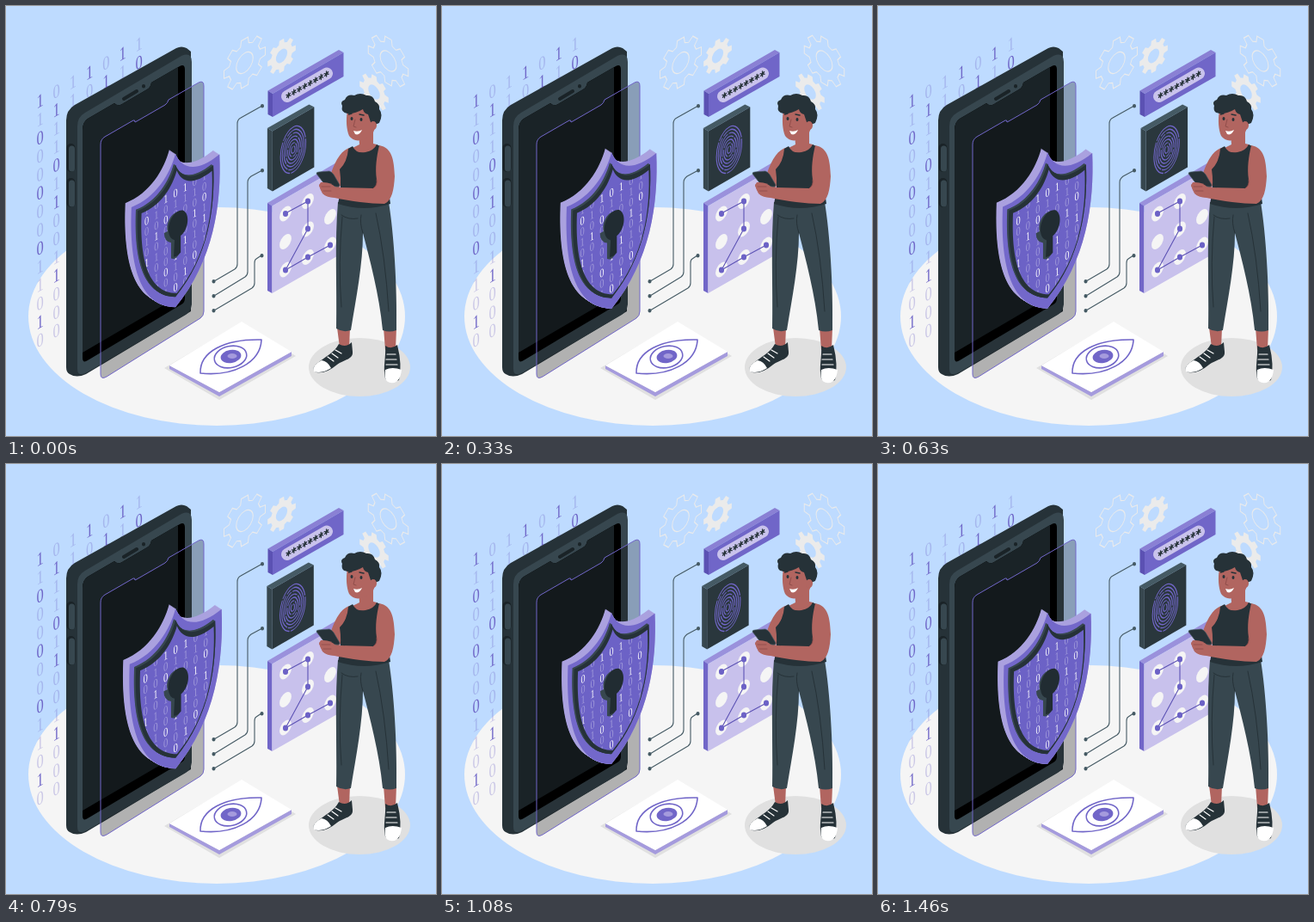
An HTML page for the animation above (1.5 s loop, 500 px wide and 500 px high).

```html
<!DOCTYPE html>
<html lang="en">
<head>
<meta charset="utf-8">
<title>Mobile security</title>
<style>
  html, body { margin: 0; height: 100%; overflow: hidden; background: #bedbff; }
  svg { display: block; width: 100%; height: 100%; }
  text { font-family: "Liberation Serif", serif; text-anchor: middle; }
  .line { fill: none; stroke-linecap: round; stroke-linejoin: round; }
</style>
</head>
<body>
<svg viewBox="0 0 500 500">
  <defs>
    <path id="crest" d="M0 173C6 192 22 210 50.5 204C53 262 44 322 0 349C-44 322-53 262-50.5 204C-22 210-6 192 0 173Z"/>
    <clipPath id="plate"><use href="#crest" transform="matrix(.8 -.48 0 .8 198.5 53.8)"/></clipPath>
  </defs>
  <rect width="500" height="500" fill="#bedbff"/>
  <ellipse cx="245" cy="361" rx="219" ry="127" fill="#f5f5f5"/>
  <g id="gears"></g>
  <g id="rain" fill="#6c62c6" font-size="22"></g>

  <g id="phone">
    <path fill="#263238" d="M70 133Q70 121 80 115L198 49Q204 46 210 49L215 53V355L93 428Q82 433 74 428Q70 426 70 420Z"/>
    <path fill="#37474f" d="M83 140Q83 129 92 124L204 58Q216 53 216 65V347Q215 355 209 359L94 426Q83 432 83 422Z"/>
    <path fill="#000" d="M89 144Q89 135 95 131L126 113Q130 117 135 114L164 97Q168 95 169 89L202 70Q208 67 208 74V340Q208 345 204 347L95 412Q89 416 89 409Z"/>
    <path fill="#1a2327" d="M89 144Q89 135 95 131L126 113Q130 117 135 114L164 97Q168 95 169 89L200 71V338L89 403Z"/>
    <path class="line" stroke="#1a2327" stroke-width="4" d="M137 108L152 99M160 93.500V93"/>
    <path class="line" stroke="#1a2327" stroke-width="10" d="M75.500 165V188M75.500 205V229"/>
    <path class="line" stroke="#37474f" stroke-width="7" d="M76.500 166V189M76.500 206V230"/>
  </g>
  <path fill="#000" fill-opacity=".28" stroke="#7166c8" d="M110 161Q110 155 115 152L148 133Q150 132 150 135L152 134L185 115Q188 113 189 109L224 89Q230 86 230 93V355Q230 360 226 363L117 431Q110 435 110 428Z"/>

  <g class="line" stroke="#455a64" stroke-width="1.100">
    <path d="M298 116L273 130Q269 132 269 137V300Q269 304 266 306L242 320"/>
    <path d="M298 191L285 198Q281 201 281 205V309Q281 313 278 315L242 337"/>
    <path d="M297 290L291 294Q289 295 289 299V322Q289 326 286 328L242 354"/>
    <path stroke-width="4" d="M298 116v.5M298 191v.5M297.500 290v.5M241.500 320v.5M241.500 337v.5M241.500 354v.5"/>
  </g>

  <g id="shield">
    <g id="rim" fill="#aaa1df"></g>
    <use href="#crest" transform="matrix(1 -.6 0 1 197 0)" fill="#7368ca"/>
    <g id="recess" fill="#37474f"></g>
    <use href="#crest" transform="matrix(.86 -.516 0 .86 197 37)" fill="#263238"/>
    <use href="#crest" transform="matrix(.8 -.48 0 .8 198.5 53.8)" fill="#6c62c6"/>
    <g id="code" clip-path="url(#plate)" fill="#fff" font-size="13.500"></g>
    <path fill="#37474f" d="M188 262C185 248 198 235 206 240C212 245 209 260 201 267L201 288Q197 295 192 293L192 275Q184 274 184 264Z"/>
    <path fill="#212c32" d="M189 262C188 249 198 236 206 238C214 242 212 260 203 267L203 286Q199 291 195 291L196 272Q190 271 189 262Z"/>
  </g>

  <g id="password">
    <path fill="#8a80d4" d="M304.500 98.500L387 51L392.500 54L310 102Z"/>
    <path fill="#5b51b3" d="M304.500 98.500L310 102V129L304.500 126Z"/>
    <path fill="#7066c8" d="M310 102L392.500 54V82L310 129Z"/>
    <path class="line" stroke="#c9c3ec" stroke-width="14" d="M327 105L373 78.500"/>
    <g id="stars" class="line" stroke="#263238" stroke-width="1.300"></g>
  </g>

  <g id="print">
    <path fill="#455a64" d="M304 142L352.500 114.500L358.500 117.500L310 145.500Z"/>
    <path fill="#37474f" d="M304 142L310 145.500V215.500L304 212Z"/>
    <path fill="#2a373d" d="M310 145.500L358.500 117.500V187.500L310 215.500Z"/>
    <g id="ridges" class="line" stroke="#7166c8" transform="matrix(.87 -.5 0 1 334 167)"></g>
  </g>

  <g id="pattern">
    <path fill="#9a91dc" d="M304 229L386 181L392 185L309.500 232.500Z"/>
    <path fill="#7166c8" d="M304 229L309.500 232.500V334L304 331Z"/>
    <path fill="#c8c1ec" d="M309.500 232.500L392 185V287L309.500 334Z"/>
    <g id="dots"></g>
    <path class="line" stroke="#5d53b5" stroke-width="1.100" d="M325 241L351 227V259L325 307L351 292L377 278"/>
    <path class="line" stroke="#6c62c6" stroke-width="6" d="M325 241v1M351 226.500v1M351 258.500v1M325 306.500v1M351 291.500v1M377 277.500v1"/>
  </g>

  <g id="eye">
    <path fill="#e0e0e0" d="M184 421L274 368L337 407L248 458Z"/>
    <path fill="#a59bdd" d="M190 418L248 449L332 402V407L248 454L190 422Z"/>
    <path fill="#fff" d="M190 418L274 367L332 402L248 449Z"/>
    <g class="line" stroke="#7166c8" stroke-width="1.600">
      <path d="M226 427C225 402 254 387 297 388C296 415 264 431 226 427Z"/>
      <ellipse cx="261" cy="408" rx="19" ry="12.500" transform="rotate(-12 261 408)"/>
    </g>
    <ellipse cx="261.500" cy="407.500" rx="12" ry="7.500" transform="rotate(-10 261.500 407.500)" fill="#7166c8"/>
    <ellipse cx="263" cy="407" rx="5.500" ry="3" fill="#a59bdd"/>
  </g>

  <g id="person">
    <ellipse cx="411" cy="420" rx="59" ry="34" fill="#e0e0e0"/>
    <g fill="#b16560">
      <path d="M385 374H400L399 398L388 397ZM439 374H454L453 400H441Z"/>
      <path d="M402 164C390 167 384 178 378 194L371 204L382 220L392 204Z"/>
    </g>
    <path fill="#263238" d="M387 393C382 403 371 408 361 416Q354 423 361 426Q372 428 385 417C393 411 404 411 403 402L402 391Q395 398 387 393Z"/>
    <path fill="#fff" d="M367 412Q355 418 358 425Q367 428 378 421Q374 413 367 412Z"/>
    <path fill="#263238" d="M441 395C442 409 438 420 441 433Q447 440 457 435Q461 418 455 394Q448 400 441 395Z"/>
    <path fill="#fff" d="M441 423Q439 437 447 438Q458 440 460 423Q449 419 441 423Z"/>
    <path class="line" stroke="#fff" stroke-width="1.200" d="M383 400L390 404M379 404L386 409M374 408L381 413M443 405H453M442 411H454M442 417H455"/>
    <path fill="#37474f" d="M386 228L445 228C451 265 455 325 454 377Q446 380 438 377C434 335 423 295 415 264C415 300 407 340 401 377Q392 380 384 375C385 325 382 275 386 228Z"/>
    <path class="line" stroke="#263238" stroke-width="1" d="M415 264Q411 252 413 243M390 243Q398 249 409 247M391 245Q386 300 390 350M430 241Q441 290 445 355"/>
    <path fill="#b16560" d="M410 147L427 141V160Q434 161 436 166Q419 188 401 166L411 161Z"/>
    <path fill="#263238" d="M403 163Q407 172 418 170Q428 168 431 161L437 164Q433 183 443 201L447 230Q416 240 386 230Q391 210 388 190Q397 181 398 166Z"/>
    <path fill="#b16560" d="M434 162C449 165 451 178 452 198C451 214 449 226 440 230C423 230 401 227 382 223Q369 222 366 214L364 208Q367 203 376 206L388 211L427 212Q432 209 431 202C429 188 431 175 434 162Z"/>
    <path fill="#263238" stroke="#455a64" stroke-width=".7" d="M361 195Q361 193 364 193L376 192Q379 193 381 196L388 208Q388 211 384 210L371 208Z"/>
    <path fill="#b16560" d="M366 205Q378 204 383 211L386 222Q374 224 368 218L364 209Z"/>
    <path class="line" stroke="#8e4b49" stroke-width=".8" d="M367 210L377 210M369 215L378 215M431 202Q432 209 427 212"/>

    <path fill="#b16560" d="M397 121C395 133 396 144 399 151Q404 158 413 156Q423 154 427 147L432 135L424 115H400Z"/>
    <path fill="#263238" d="M397 125Q389 124 391 116Q388 111 394 109Q397 102 405 104Q412 100 419 104Q427 103 429 111Q435 114 434 120Q439 126 434 136Q428 139 424 135L421 126Q416 125 415 120Q405 126 397 125Z"/>
    <ellipse cx="427" cy="139" rx="4" ry="5" fill="#b16560"/>
    <path class="line" stroke="#263238" stroke-width="1.400" d="M398.500 126L402 125M411 126L416 127"/>
    <g fill="#263238"><ellipse cx="402" cy="131" rx="1.500" ry="2"/><ellipse cx="413" cy="132" rx="1.500" ry="2"/></g>
    <path class="line" stroke="#8e4b49" stroke-width=".9" d="M406 132L404 140L407 141"/>
    <path fill="#fff" d="M404 145Q409 147 414 144Q411 151 406 149Z"/>
  </g>
</svg>
<script>
const $ = id => document.getElementById(id);
const range = n => [...Array(n).keys()];
const fill = (id, parts) => { $(id).innerHTML = parts.join(''); };

function gear(x, y, radius, skew, style) {
  const at = (r, a) => `${(r * Math.cos(a)).toFixed(1)} ${(r * Math.sin(a)).toFixed(1)}`;
  const teeth = range(8).map(i => [[-.26, .76], [-.16, 1], [.16, 1], [.26, .76]]
    .map(([da, k]) => at(radius * k, i * Math.PI / 4 + da)).join('L')).join('L');
  const hole = radius * .4;
  return `<path transform="matrix(.87 ${skew} 0 1 ${x} ${y})" fill-rule="evenodd" ${style}
    d="M${teeth}ZM${hole} 0A${hole} ${hole} 0 1 0 ${-hole} 0A${hole} ${hole} 0 1 0 ${hole} 0Z"/>`;
}
const outlined = 'fill="none" stroke="#ebebeb" stroke-width="1.1"';
const solid = 'fill="#ebebeb"';
fill('gears', [
  gear(277.5, 66, 28, -.5, outlined), gear(320.5, 58, 19, -.5, solid),
  gear(444.5, 64, 27, .5, outlined), gear(428, 100, 19.5, .5, solid)
]);

// Digits 1 and 0 are bright; i and o are their faint forms.
const column = (x, y, step, digits, faint) => [...digits].map((c, i) => {
  const dim = c === 'i' || c === 'o';
  return `<text transform="matrix(.75 -.43 0 1 ${x} ${y + i * step})" dy=".34em"
    opacity="${dim ? faint : .95}">${c === 'i' || c === '1' ? 1 : 0}</text>`;
}).join('');

fill('rain', ['1i0oo0oo0iio1o', 'o1ii0i1ooi1ooo', 'iii', '1o1', 'o1', '1ii', 'i0']
  .map((digits, i) => column(39.5 + i * 19.2, 110 - i * 11, 21.4, digits, .3)));
fill('code', ['i0oio1o', 'oio1oioioi', '1o0oioo0oi', '0iooio1io0', '1ioio1io1o', 'oio1oio0io', 'io0i1oio']
  .map((digits, i) => column(164 + i * 11, 237.8 - i * 6.6, 12, digits, .35)));

// Stacked copies give the shield and its plate their thickness.
const extrude = (depth, scale, x, y) => range(depth * 2 + 1).map(i =>
  `<use href="#crest" transform="matrix(${scale} ${-.6 * scale} 0 ${scale} ${x - i / 2} ${y - i * .33})"/>`);
fill('rim', extrude(7, 1, 197, 0));
fill('recess', extrude(2, .86, 197, 37));

fill('stars', range(8).map(i =>
  `<path transform="translate(${328.5 + i * 6.3} ${103.8 - i * 3.55})" d="M0-3V3M-2.4-.3L2.4.3M-2 2.4L2-2.4"/>`));
fill('ridges', range(7).map(i => {
  const rx = 2.5 + i * 2.4, ry = 4 + i * 3.7;
  return `<ellipse rx="${rx}" ry="${ry}" stroke-width="1.2" stroke-dasharray="${14 + i * 5} 2.5" stroke-dashoffset="${i * 9}"/>`;
}));
fill('dots', range(9).map(i => {
  const col = i % 3, row = Math.floor(i / 3);
  return `<circle r="8" transform="matrix(.87 -.5 0 1 ${325 + col * 26} ${241.5 + row * 32.5 - col * 14.5})" fill="#f5f5f5"/>`;
}));

// Keyframes at every tenth of the loop, joined linearly.
const pulse = [1, 1.1, 1.05, 1, 1, 1.1, 1, 1, 1, 1, 1];
const shake = [0, -1, 2, -4, 4, -4, 4, -4, 2, -1, 0];
function sample(keys, phase) {
  const i = Math.floor(phase * 10);
  return keys[i] + (keys[i + 1] - keys[i]) * (phase * 10 - i);
}

const LOOP = 1500, STEPS = 36;
const start = performance.now();
function draw() {
  const time = (performance.now() - start) % LOOP;
  const step = Math.floor(time / LOOP * STEPS + .12) % STEPS;
  const phase = (step + .5) / STEPS;
  $('shield').setAttribute('transform',
    `translate(193.5 259) scale(${sample(pulse, phase)}) translate(-193.5 -259)`);
  $('print').setAttribute('transform', `translate(${sample(shake, phase)} 0)`);
  requestAnimationFrame(draw);
}
draw();
</script>
</body>
</html>
```
